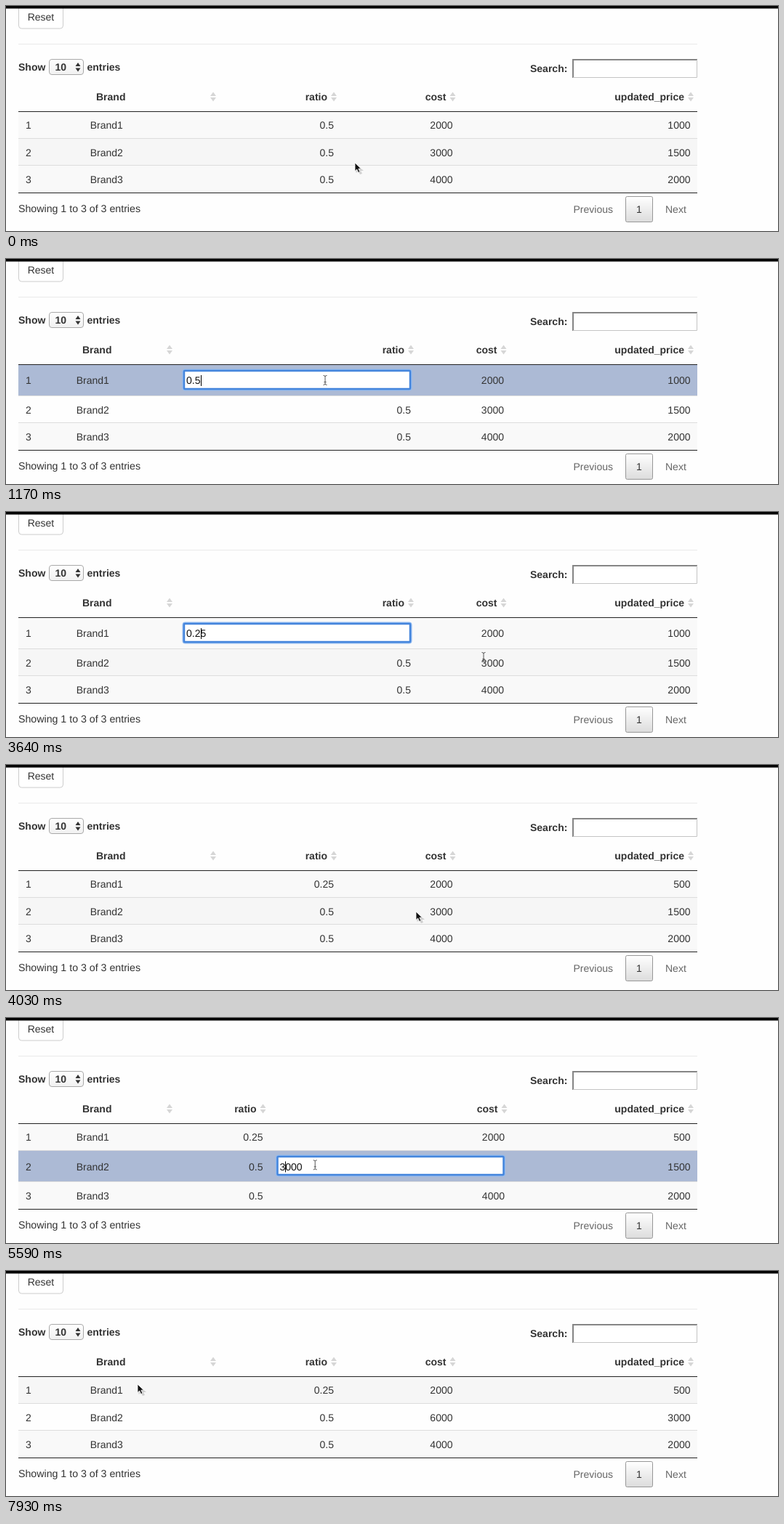
Write an HTML page that moves like this. It is 1062 by 310 pixels and loops after 8 s.

```html
<!DOCTYPE html>
<html lang="en">
<head>
<meta charset="utf-8">
<title>Editable table</title>
<style>
html, body { margin: 0; width: 100%; height: 100%; overflow: hidden; background: #fefefe; }
svg { display: block; }
text { font: 14px "Liberation Sans", Arial, sans-serif; fill: #333; text-rendering: geometricPrecision; white-space: pre; }
.b { font-weight: bold; }
.e { text-anchor: end; }
.m { text-anchor: middle; }
.dim { fill: #666; }
.typed { fill: #111; }
</style>
</head>
<body>
<svg width="1062" height="310" viewBox="0 0 1062 310">
  <defs>
    <linearGradient id="btn" x2="0" y2="1"><stop stop-color="#fff"/><stop offset="1" stop-color="#dcdcdc"/></linearGradient>
    <linearGradient id="sel" x2="0" y2="1"><stop stop-color="#fff"/><stop offset="1" stop-color="#f1f1f1"/></linearGradient>
  </defs>
  <rect x="17.5" y="-5" width="61" height="36" rx="4" fill="#fff" stroke="#ccc"/>
  <rect width="1062" height="3.5"/>
  <text x="29.7" y="20">Reset</text>
  <path d="M17 52.5H951" stroke="#eaeaea"/>
  <text class="b" x="17" y="89">Show</text>
  <rect x="59.5" y="73.5" width="47" height="21" rx="3.5" fill="url(#sel)" stroke="#a9a9a9"/>
  <text class="b" x="67.5" y="89">10</text>
  <path d="M95.5 83 99 78l3.5 5zM95.5 85.500 99 90.500l3.500-5z" fill="#333"/>
  <text class="b" x="111.500" y="89">entries</text>
  <text class="b" x="721" y="91">Search:</text>
  <rect x="779" y="73" width="172" height="26" fill="#fff"/>
  <path d="M780 99V74H951" fill="none" stroke="#858585" stroke-width="2"/>
  <path d="M780 98.500H950.500V74" fill="none" stroke="#c4c4c4"/>
  <g id="table"></g>
  <g id="pointer"></g>
</svg>
<script>
const LOOP = 8000, STEP = 130;
const table = document.getElementById('table'), pointer = document.getElementById('pointer');

// Column edges, row tops and input box for each table layout
const layouts = {
  view:  { brand: 115.7, head: 124, icons: [285, 451, 614.5, 942], right: [451, 614.5], tops: [146, 182, 219, 257], base: [169, 206.5, 244] },
  ratio: { brand: 96.7, head: 105, icons: [225, 557, 684.5, 942], right: [557, 685], tops: [146, 188, 225, 263], base: [172, 212.5, 250],
           input: { row: 0, col: 0, x: 244.5, y: 153.5 } },
  cost:  { brand: 96.7, head: 105, icons: [225, 353.5, 685.5, 942], right: [353.5, 686], tops: [146, 182, 225, 263], base: [169, 209.5, 250],
           input: { row: 1, col: 1, x: 373, y: 190.5 } }
};

// State changes, each merged over the ones before
const changes = [
  [0, { layout: 'view', ratio: '0.5', cost: '3000', prices: [1000, 1500, 2000], picked: -1, mark: null, typed: '', caret: 0, shape: 'arrow' }],
  [520, { shape: 'beam' }],
  [780, { picked: 0 }],
  [910, { mark: [0, 0] }],
  [1170, { layout: 'ratio', mark: null, typed: '0.5', caret: 3 }],
  [2340, { picked: -1, caret: 2 }],
  [2860, { typed: '0.25', caret: 3 }],
  [3900, { layout: 'view', ratio: '0.25', prices: [500, 1500, 2000], shape: 'arrow' }],
  [4160, { shape: 'beam' }],
  [4550, { picked: 1 }],
  [4680, { picked: -1, mark: [1, 1] }],
  [4940, { layout: 'cost', mark: null, typed: '3000', caret: 4 }],
  [5590, { picked: 1, caret: 1 }],
  [5850, { typed: '000', caret: 0 }],
  [6760, { typed: '6000', caret: 1 }],
  [6890, { shape: 'arrow' }],
  [7280, { layout: 'view', cost: '6000', prices: [500, 3000, 2000], picked: -1 }]
];

// Pointer path: time, x, y
const path = [
  [0, 480, 216], [520, 440, 164], [910, 440, 164], [1170, 439, 167], [1950, 264, 167], [2210, 263, 167],
  [3120, 263, 167], [3640, 657, 200], [4030, 564, 202], [4160, 592, 205], [4290, 592, 205], [4680, 592, 193],
  [4940, 592, 196], [5850, 384, 204], [6760, 384, 204], [7020, 372, 272], [7150, 372, 272], [7930, 181, 156]
];

const text = (x, y, s, cls = '') => `<text x="${x}" y="${y}" class="${cls}">${s}</text>`;
const rect = (x, y, w, h, attrs) => `<rect x="${x}" y="${y}" width="${w}" height="${h}" ${attrs}/>`;
const line = (y, color) => `<path d="M17 ${y + 0.5}H951" stroke="${color}"/>`;
const sortIcon = x => `<path d="M${x - 4} 124l4-5.5 4 5.5zM${x - 4} 126l4 5.5 4-5.5z" fill="#d6d6d6"/>`;

function pointerAt(t) {
  let i = 1;
  while (i < path.length - 1 && path[i][0] < t) i++;
  const [t0, x0, y0] = path[i - 1], [t1, x1, y1] = path[i];
  const k = Math.min(1, (t - t0) / (t1 - t0)), e = k * k * (3 - 2 * k);
  return [x0 + (x1 - x0) * e, y0 + (y1 - y0) * e];
}

function inputBox({ x, y }, base, s) {
  const tx = x + 3.5;
  const w = [...s.typed.slice(0, s.caret)].reduce((sum, c) => sum + (c === '.' ? 3.9 : 7.8), 0);
  const cx = Math.round(tx + w) + 0.5;
  return rect(x - 1, y - 1, 314, 28, 'rx="3" fill="none" stroke="#8fb9f0" stroke-width="2"') +
    rect(x + 0.5, y + 0.5, 311, 25, 'rx="1" fill="#fff" stroke="#4485dc" stroke-width="2.5"') +
    text(tx, base, s.typed, 'typed') +
    `<path d="M${cx} ${base - 12}v15" stroke="#000"/>`;
}

function drawTable(s, my) {
  const L = layouts[s.layout], { tops, base, icons, input } = L;
  const cells = [['0.5', '2000'], ['0.5', s.cost], ['0.5', '4000']];
  cells[0][0] = s.ratio;
  let out = text(L.head, 130, 'Brand', 'b');
  ['ratio', 'cost', 'updated_price'].forEach((h, i) => out += text(icons[i + 1] - 9, 130, h, 'b e'));
  out += icons.map(sortIcon).join('');

  for (let r = 0; r < 3; r++) {
    const hover = my >= tops[r] && my < tops[r + 1];
    const fill = r === s.picked ? '#acbad5' : hover ? '#f6f6f6' : r % 2 ? '#fefefe' : '#f9f9f9';
    out += rect(17, tops[r], 934, tops[r + 1] - tops[r], `fill="${fill}"`);
    if (r) out += line(tops[r], '#ddd');
    out += text(27, base[r], r + 1) + text(L.brand, base[r], 'Brand' + (r + 1));
    cells[r].forEach((value, c) => {
      if (input && input.row === r && input.col === c) {
        out += inputBox(input, base[r], s);
        return;
      }
      if (s.mark && s.mark[0] === r && s.mark[1] === c) {
        const w = value.length > 3 ? 31.5 : 20;
        out += rect(L.right[c] - w, base[r] - 13.5, w, 17, 'fill="#aecbe8"');
      }
      out += text(L.right[c], base[r], value, 'e');
    });
    out += text(941.5, base[r], s.prices[r], 'e');
  }
  const end = tops[3];
  return out + line(145, '#222') + line(end, '#222') +
    `<text x="17" y="${end + 27}" style="font-size:14.2px">Showing 1 to 3 of 3 entries</text>` +
    text(780.5, end + 28, 'Previous', 'dim') +
    rect(852.5, end + 5.5, 37, 35, 'rx="2" fill="url(#btn)" stroke="#979797"') +
    text(871, end + 28, '1', 'm') + text(907, end + 28, 'Next', 'dim');
}

function drawPointer(shape, x, y) {
  const d = shape === 'arrow'
    ? '<path d="M1.500 2v12l3-2 2.500 4 3-1-2-4h4z" fill="#000" opacity=".16"/><path d="M0 0v11.500l2.700-2.500 2 4.500 2.200-1-2-4.300h3.600z" fill="#111" stroke="#fff" stroke-width=".8"/>'
    : '<path d="M-2.500-6.500Q0-6.500 0-5Q0-6.500 2.500-6.500M0-5V5M-2.500 6.500Q0 6.500 0 5Q0 6.500 2.500 6.500M-1.500 2.500h3" fill="none" stroke="#555"/>';
  return `<g transform="translate(${x.toFixed(1)} ${y.toFixed(1)})">${d}</g>`;
}

let shown = -1;
function tick(now) {
  const step = Math.floor((now % LOOP) / STEP);
  if (step !== shown) {
    shown = step;
    const t = step * STEP, [x, y] = pointerAt(t), s = {};
    for (const [at, patch] of changes) if (at <= t) Object.assign(s, patch);
    table.innerHTML = drawTable(s, y);
    pointer.innerHTML = drawPointer(s.shape, x, y);
  }
  requestAnimationFrame(tick);
}
const start = performance.now();
tick(0);
function frame() { return performance.now() - start; }
</script>
</body>
</html>
```
